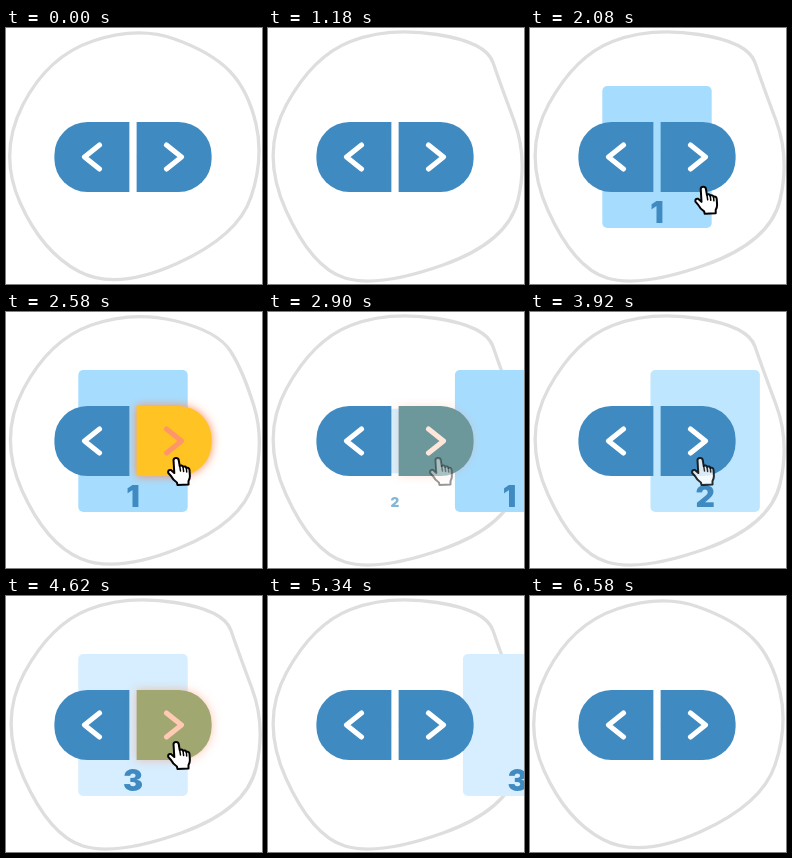
These frames come from a looping animation (256x256 px, 6600 ms). An HTML page with a canvas:

```html
<!DOCTYPE html>
<html lang="en">
<head>
<meta charset="utf-8">
<title>Card slider</title>
<style>
  html, body { margin: 0; width: 100%; height: 100%; overflow: hidden; background: #fff; }
  canvas { display: block; width: 100vw; height: 100vh; }
</style>
</head>
<body>
<canvas></canvas>
<script>
const SIZE = 256, LOOP = 6600, CENTER = 127, MIDDLE = 129;
const BLUE = [63, 138, 192], YELLOW = [255, 195, 35], WHITE = [255, 255, 255], ORANGE = [255, 150, 105];

const canvas = document.querySelector('canvas');
const ctx = canvas.getContext('2d');
const density = Math.max(1, window.devicePixelRatio || 1);
canvas.width = canvas.height = SIZE * density;

// Times in ms: card grows and leaves, cursor arrives and departs, button lets go.
const cards = [
  { grow: 1210, arrive: 1960, release: 2766, leave: 2747, depart: 2830 },
  { grow: 2850, arrive: 3160, release: 3690, leave: 3828, depart: 3900 },
  { grow: 3930, arrive: 4240, release: 4860, leave: 5180, depart: 5040 }
].map((times, i) => ({
  ...times,
  press: times.arrive + 300,
  label: i + 1,
  color: `rgb(${166 + 24 * i},${221 + 8.5 * i},255)`
}));

// Corners of two hand-drawn rings; the curve rounds them off.
const roundRing = [[132, -2], [205, 24], [242, 62], [258, 130], [232, 208], [110, 263], [36, 224], [-8, 125], [42, 28]];
const bentRing = [[120, -1], [218, 14], [232, 55], [260, 130], [240, 214], [110, 260], [44, 240], [-8, 125], [45, 28]];

const hand = new Path2D(`M-3 3 Q-2.6 1 -.5 1 Q1.8 1 2.2 3 L3.2 9 Q5.2 7.6 6.5 9.8 Q9 8.6 9.8 11
  Q12.6 10 13 13 L13.4 19 Q13.4 22 12 24 L12 27.5 L1 28 L.4 25.5 Q-3.5 23 -5.5 19
  L-8.3 15.8 Q-8.8 12.5 -5.6 13 L-2.2 16 Z`);
const knuckles = new Path2D('M3.2 9 L4 14 M6.6 10.5 L7.1 14.5 M9.9 11.5 L10.2 15');

const clamp = v => Math.min(1, Math.max(0, v));
const progress = (t, start, duration) => clamp((t - start) / duration);
const easeOut = p => 1 - (1 - p) ** 3;
const easeInOut = p => (1 - Math.cos(Math.PI * p)) / 2;
const mix = (a, b, k) => a.map((v, i) => v + (b[i] - v) * k);
const blend = (a, b, k) => `rgb(${mix(a, b, k).map(Math.round)})`;

const cursorOpacity = (card, t) =>
  progress(t, card.arrive, 80) * (1 - progress(t, card.depart, 120));
const buttonGlow = (card, t) =>
  easeInOut(progress(t, card.press, 160)) * (1 - easeInOut(progress(t, card.release, 200)));

function drawRing(t) {
  const step = Math.floor((t + 20) / 200) % 33;
  const bend = Math.min(1, step % 4 / 2);
  const corners = roundRing.map((corner, i) => mix(corner, bentRing[i], bend));
  const last = corners[corners.length - 1];
  ctx.strokeStyle = '#dedede';
  ctx.lineWidth = 3.3;
  ctx.beginPath();
  ctx.moveTo(...mix(last, corners[0], 0.5));
  corners.forEach((corner, i) =>
    ctx.quadraticCurveTo(...corner, ...mix(corner, corners[(i + 1) % corners.length], 0.5)));
  ctx.closePath();
  ctx.stroke();
}

function drawCard(card, t) {
  const scale = easeOut(progress(t, card.grow, 280));
  const leaving = progress(t, card.leave, 300);
  if (!scale || leaving === 1) return;
  ctx.save();
  ctx.translate(CENTER + 220 * easeInOut(leaving), 0);
  ctx.globalAlpha = clamp(scale * 1.4);

  ctx.save();
  ctx.translate(0, MIDDLE);
  ctx.scale(scale, scale);
  ctx.fillStyle = card.color;
  ctx.beginPath();
  ctx.roundRect(-54.7, -71, 109.4, 142, 5);
  ctx.fill();
  ctx.restore();

  ctx.translate(0, 194.5);
  ctx.scale(scale, scale);
  ctx.fillStyle = `rgb(${BLUE})`;
  ctx.font = '900 30px Inter, sans-serif';
  ctx.textAlign = 'center';
  ctx.fillText(card.label, 0, 0);
  ctx.restore();
}

// side: -1 for the left button, 1 for the right one
function drawButton(side, glow) {
  ctx.save();
  ctx.translate(CENTER, MIDDLE);
  ctx.scale(side, 1);

  ctx.fillStyle = blend(BLUE, YELLOW, glow);
  ctx.shadowColor = `rgba(255,140,90,${glow})`;
  ctx.shadowBlur = 10 * density;
  ctx.beginPath();
  ctx.roundRect(3.6, -35, 75, 70, [0, 33, 33, 0]);
  ctx.fill();

  ctx.shadowColor = 'transparent';
  ctx.strokeStyle = blend(WHITE, ORANGE, glow);
  ctx.lineWidth = 5.1;
  ctx.lineCap = ctx.lineJoin = 'round';
  ctx.beginPath();
  ctx.moveTo(33.5, -12);
  ctx.lineTo(48.5, 0);
  ctx.lineTo(33.5, 12);
  ctx.stroke();
  ctx.restore();
}

function drawCursor(card, t) {
  const away = 1 - easeOut(progress(t, card.arrive, 340));
  ctx.save();
  ctx.globalAlpha = cursorOpacity(card, t);
  ctx.translate(170.5 + 12 * away, 145 + 48 * away);
  ctx.lineJoin = ctx.lineCap = 'round';
  ctx.fillStyle = '#fff';
  ctx.strokeStyle = '#000';
  ctx.lineWidth = 2;
  ctx.fill(hand);
  ctx.stroke(hand);
  ctx.lineWidth = 1.5;
  ctx.stroke(knuckles);
  ctx.restore();
}

function draw(t) {
  ctx.setTransform(density, 0, 0, density, 0, 0);
  ctx.fillStyle = '#fff';
  ctx.fillRect(0, 0, SIZE, SIZE);
  drawRing(t);
  cards.forEach(card => drawCard(card, t));
  drawButton(-1, 0);
  drawButton(1, Math.max(...cards.map(card => buttonGlow(card, t))));
  cards.forEach(card => drawCursor(card, t));
}

const start = performance.now();
function tick() {
  draw((performance.now() - start) % LOOP);
  requestAnimationFrame(tick);
}
tick();
</script>
</body>
</html>
```
